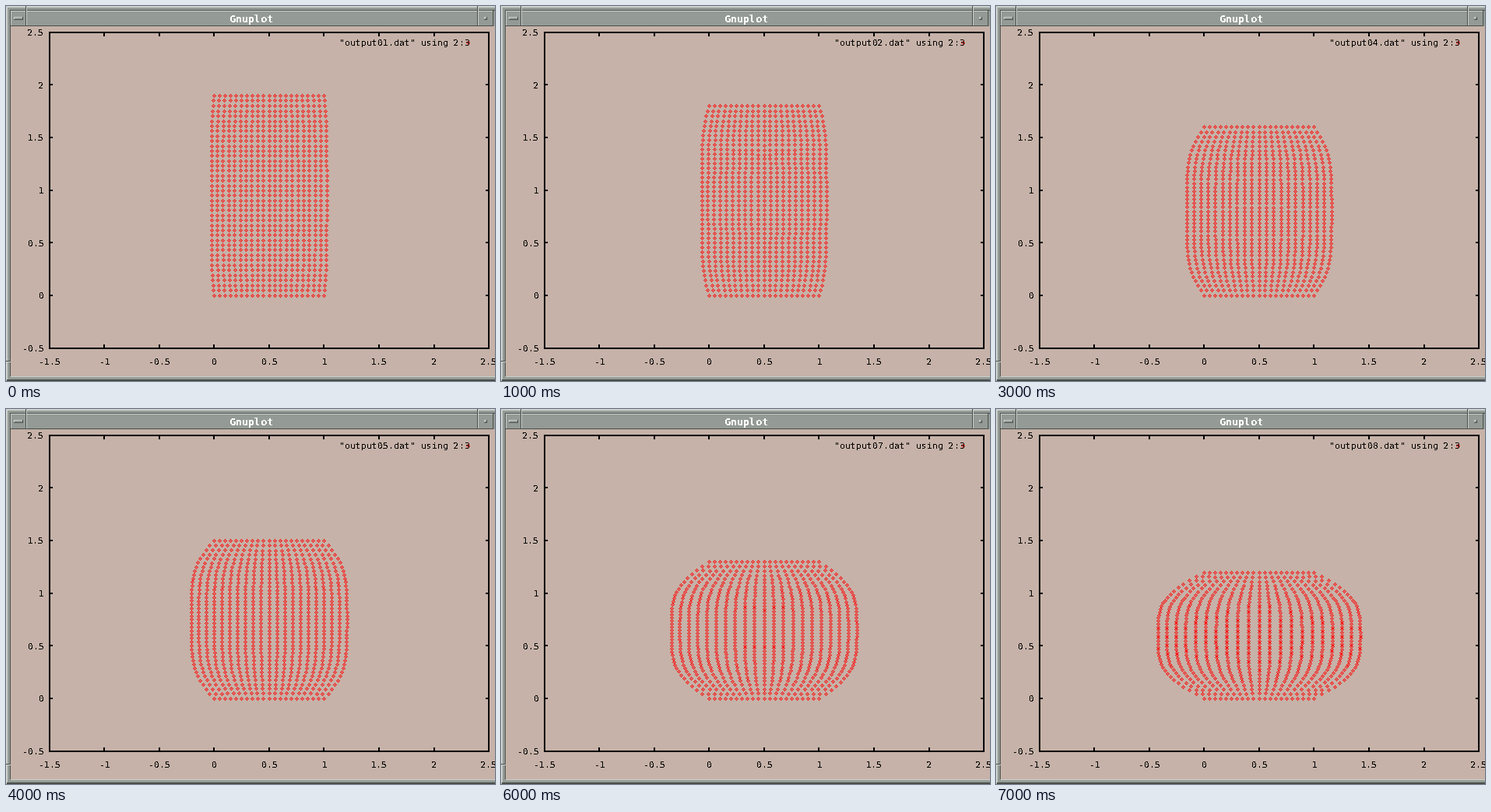
Animation, 628 px wide and 482 px high, one loop 8000 ms. Source, as a matplotlib script:

```python
import numpy as np
import matplotlib.pyplot as plt
from matplotlib.animation import FuncAnimation

plt.rcParams["text.hinting_factor"] = 1  # whole-pixel letter spacing

W, H, DPI = 628, 482, 100
FRAMES = 8
TAN, RED, BLACK = (198, 178, 168), (255, 0, 0), (0, 0, 0)
GRAY, LIGHT, DARK = (148, 155, 150), (204, 209, 206), (74, 78, 75)

# Half-width of the sheet at mid-height, in pixels, after each squeeze
BULGE = (74, 80, 86, 93, 100, 109, 119, 130)
DIAMOND = [(dx, dy) for dx in range(-2, 3) for dy in range(-2, 3)
           if abs(dx) + abs(dy) in (0, 2)]


def px(x):
    return 267.85 + 141.1 * x


def py(y):
    return 372.4 - 135.33 * y


def box(img, x0, y0, x1, y1, color):
    img[y0:y1, x0:x1] = color


def bevel(img, x0, y0, x1, y1):
    box(img, x0, y0, x1, y1, DARK)
    box(img, x0, y0, x1 - 1, y1 - 1, LIGHT)
    box(img, x0 + 1, y0 + 1, x1 - 1, y1 - 1, GRAY)


def diamond(img, x, y):
    for dx, dy in DIAMOND:
        img[y + dy, x + dx] = RED


def window():
    img = np.full((H, W, 3), TAN, np.uint8)
    # Window frame
    box(img, 0, 0, W, 26, GRAY)
    box(img, 0, 476, W, H, GRAY)
    box(img, 0, 0, 6, H, GRAY)
    box(img, 0, 0, W, 2, LIGHT)
    box(img, 0, 0, 2, H, LIGHT)
    box(img, 5, 5, 6, 476, DARK)
    box(img, 5, 5, W, 6, DARK)
    box(img, 6, 476, W, 477, LIGHT)
    box(img, 1, 480, W, H, DARK)
    box(img, 0, 456, 6, 457, DARK)
    box(img, 0, 457, 6, 458, LIGHT)
    for x in (25, 605):
        box(img, x, 0, x + 1, 6, DARK)
        box(img, x + 1, 0, x + 2, 6, LIGHT)
    # Title bar and its buttons
    bevel(img, 6, 6, 26, 26)
    bevel(img, 26, 6, 606, 26)
    bevel(img, 606, 6, 626, 26)
    bevel(img, 10, 14, 22, 18)
    bevel(img, 614, 14, 618, 18)
    # Plot border and ticks
    for x in (55, 619):
        box(img, x, 33, x + 2, 441, BLACK)
    for y in (33, 439):
        box(img, 55, y, 621, y + 2, BLACK)
    for v in np.arange(-1, 2.1, 0.5):
        x = int(px(v)) - 1
        box(img, x, 34, x + 2, 39, BLACK)
        box(img, x, 435, x + 2, 440, BLACK)
    for v in np.arange(0, 2.1, 0.5):
        y = int(py(v)) - 1
        box(img, 56, y, 60, y + 2, BLACK)
        box(img, 616, y, 620, y + 2, BLACK)
    diamond(img, 593, 47)
    return img


def sheet(step):
    """Pixel positions of a 21 x 41 grid squeezed between two plates."""
    k = step + 1
    power = 5 - 0.17 * k
    gain = BULGE[step] / 70.5 - 1
    u = np.linspace(-1, 1, 21)

    def swell(s):
        return 1 - np.abs(s)[:, None] ** power

    def bend(s):
        return 0.07 * (k / 8) ** 3 * swell(s)

    s = np.linspace(-1, 1, 41)
    xs = 338 + 70.5 * (1 + gain * swell(s)) * u * (1 + bend(s) * (1 - u * u))

    # Cells keep their area: wider ones are flatter
    mid = s[:-1] + 0.025
    gaps = 1 / ((1 + gain * swell(mid)) * (1 + bend(mid) * (1 - 3 * u * u)))
    rise = np.vstack([np.zeros(21), np.cumsum(gaps, axis=0)]) / gaps.sum(axis=0)
    ys = py(rise * (2 - 0.1 * k))
    return zip(np.floor(xs + 0.01).astype(int).flat, ys.astype(int).flat)


fig = plt.figure(figsize=(W / DPI, H / DPI), dpi=DPI)
ax = fig.add_axes([0, 0, 1, 1])
ax.axis("off")
base = window()
view = ax.imshow(base, extent=(0, W, H, 0), interpolation="nearest", aspect="auto")


def label(x, y, text, ha="left", size=10.7, **style):
    return ax.text(x, y, text, ha=ha, va="baseline", fontsize=size * 72 / DPI,
                   family="DejaVu Sans Mono", antialiased=False, **style)


label(315.5, 21, "Gnuplot", "center", 13.2, color="white", weight="bold")
for v in np.arange(-1.5, 2.6, 0.5):
    label(px(v), 461, f"{v:g}", "center")
for v in np.arange(-0.5, 2.6, 0.5):
    label(49, round(py(v)) + 4, f"{v:g}", "right")
legend = label(428, 51, "")


def draw(step):
    img = base.copy()
    for x, y in sheet(step):
        diamond(img, x, y)
    view.set_data(img)
    legend.set_text(f'"output{step + 1:02d}.dat" using 2:3')
    return view, legend


anim = FuncAnimation(fig, draw, frames=FRAMES, interval=1000, repeat=True,
                     repeat_delay=0)
plt.show()
```
